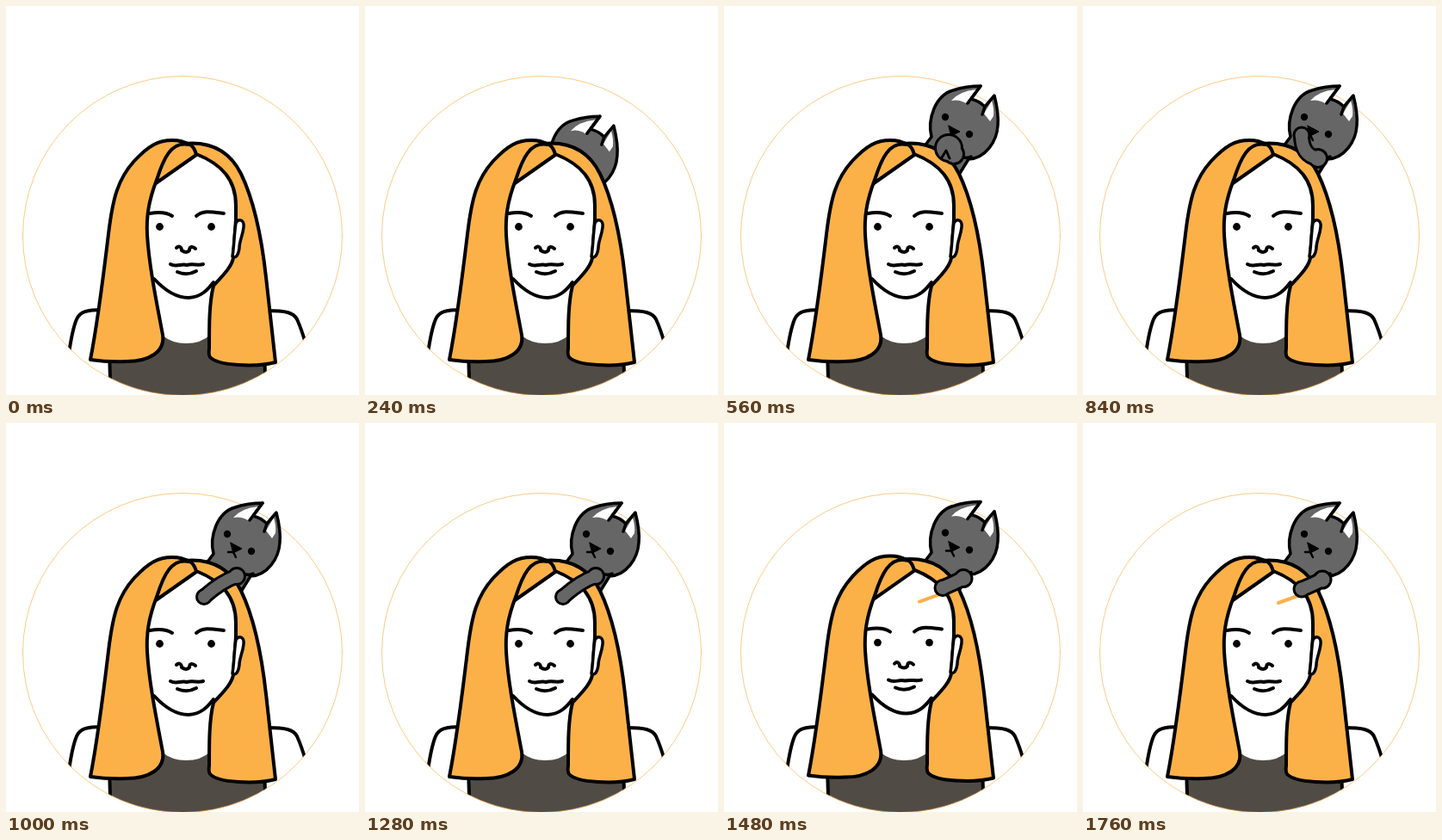
An HTML page with a canvas that plays this animation: 410x452 px, repeating every 2.68 s.

```html
<!DOCTYPE html>
<html lang="en">
<head>
<meta charset="utf-8">
<title>Cat behind the hair</title>
<style>
  html, body { margin: 0; width: 100%; height: 100%; overflow: hidden; background: #fff; }
  canvas { display: block; width: 410px; height: 452px; }
</style>
</head>
<body>
<canvas id="stage" width="410" height="452"></canvas>
<script>
const ctx = document.getElementById('stage').getContext('2d');
const LOOP = 2680, STEP = 40;
const HAIR = '#fbb148', FUR = '#666', SHIRT = '#514b46', INK = '#000', WHITE = '#fff';

const path = d => new Path2D(d);
const disc = (x, y, r) => {
  const p = new Path2D();
  p.arc(x, y, r, 0, Math.PI * 2);
  return p;
};
const clamp = v => Math.max(0, Math.min(1, v));

function fill(p, color) {
  ctx.fillStyle = color;
  ctx.fill(p);
}
function line(p, width = 4, color = INK) {
  ctx.strokeStyle = color;
  ctx.lineWidth = width;
  ctx.stroke(p);
}

const badge = disc(205, 267, 185.5);
const shirt = path('M120 395L182 383Q193 392 209 392Q227 392 237 382L300 395L302 452H120Z');
const shirtSides = path('M120 400L121 434M300 400L301 428');
const shoulders = path('M112 353C94 353 86 355 82 364Q77 376 73 404M304 354C324 354 334 356 338 364Q343 375 348 392');

const face = path('M172 205C164 225 162 260 167 290L172 317C184 330 197 339 212 339C227 338 234 330 241 321L264 296L268 232C267 200 248 180 221 172Z');
const jaw = path('M172 317C184 330 197 339 212 339C227 338 234 330 241 321');
const hairRight = path('M207 160C238 157 260 169 273 195C288 226 297 270 302 315L313 414C290 420 246 418 237 408Q235 405 236 398C236 370 236 345 241 325C253 312 263 302 264 292L267 248V232C267 202 251 184 221 172Z');
const hairLock = path('M174 206L221 173C219 164 214 159 206 159C190 159 181 178 174 206Z');
const hairLeft = path('M98 411C107 365 113 315 119 265C124 223 130 201 149 180C166 162 177 156 193 156Q205 156 212 161C192 157 183 177 175 202C165 228 163 246 164 266C166 300 174 340 182 382C185 402 166 413 140 413Q119 414 98 411Z');
const ear = path('M267 252C271 246 277 249 276 257C275 267 271 273 271 281C270 289 267 294 263 291C265 278 265 264 267 252Z');
const features = path('M167 241Q184 238 193 244M221 244C229 237 238 239 253 241' +
  'M198 281C201 278 204 280 204 284Q210 288 213 284C213 279 217 279 220 282' +
  'M191 300C198 304 203 299 210 301C217 299 223 302 229 300M199 309Q210 314 221 308');

const cat = path('M205 200L241 152C236 132 245 104 266 98C278 94 288 93 298 93L287 108Q296 110 303 117L314 104C317 116 319 130 318 139C317 157 304 177 284 178L255 225');
const catFolds = path('M298 93L283 113M303 117L300 126M279 176Q284 177 287 175');
const earLinings = path('M264 110Q273 99 293 97L281 113Q273 108 264 110ZM302 125L311 110Q314 120 313 128L309 134Z');
const nose = path('M261 139L274 146L264 151Z');
const catMouth = path('M258 150H264L267 156');

// time, then: shoulder x y, bend x y, paw x y, shoulder radius, paw radius
const PAW = [
  [520, 268, 178, 265, 175, 262, 172, 9, 11],
  [560, 267, 172, 264, 168, 261, 165, 10, 14],
  [640, 272, 176, 257, 172, 252, 139, 9, 7.5],
  [680, 272, 176, 257, 172, 252, 137, 9, 7.5],
  [840, 273, 177, 254, 174, 254, 150, 9, 7.5],
  [920, 270, 177, 255, 182, 239, 180, 8, 7.5],
  [1000, 268, 178, 250, 184, 230, 202, 8, 7],
  [1280, 268, 178, 250, 184, 230, 202, 8, 7],
  [1480, 278, 182, 266, 188, 254, 193, 8.5, 7.5]
];

function pawPose(t) {
  const next = PAW.findIndex(k => k[0] > t);
  if (next < 0) return PAW[PAW.length - 1].slice(1);
  const a = PAW[next - 1], b = PAW[next];
  const u = (t - a[0]) / (b[0] - a[0]);
  return a.slice(1).map((v, i) => v + (b[i + 1] - v) * u);
}

function drawPaw(t) {
  const [sx, sy, mx, my, px, py, sr, pr] = pawPose(t);
  const arm = path(`M${sx} ${sy}Q${mx} ${my} ${px} ${py}`);
  const ends = [disc(sx, sy, sr), disc(px, py, pr)];
  const width = 2 * Math.min(sr, pr) - 1;
  line(arm, width + 6);
  ends.forEach(e => line(e, 6));
  line(arm, width, FUR);
  ends.forEach(e => fill(e, FUR));
  if (t >= 560 && t < 600) line(path('M253 176L258 168L262 177'), 3);
}

function drawCat(t) {
  const left = 62 * (1 - clamp((t - 80) / 440)) ** 2;
  ctx.save();
  ctx.translate(-left, left * 1.4);
  fill(cat, FUR);
  fill(earLinings, WHITE);
  line(cat, 3.5);
  line(catFolds, 3.5);
  fill(disc(257, 129, 4.2), INK);
  fill(disc(285, 149, 4.2), INK);
  fill(nose, INK);
  line(nose, 1);
  line(catMouth, 2.5);
  ctx.restore();
}

function drawBody() {
  ctx.save();
  ctx.clip(badge);
  fill(shirt, SHIRT);
  line(shirtSides);
  line(shoulders);
  ctx.restore();
  ctx.globalAlpha = 0.75;
  line(badge, 0.9, HAIR);
  ctx.globalAlpha = 1;
}

function drawHead() {
  fill(face, WHITE);
  line(jaw);
  for (const part of [hairRight, hairLock, hairLeft]) {
    fill(part, HAIR);
    line(part);
  }
  fill(ear, WHITE);
  line(ear, 3.5);
  line(features);
  fill(disc(178.5, 256.5, 4.4), INK);
  fill(disc(238.5, 256.5, 4.4), INK);
}

function drawScratch(t) {
  const u = clamp((t - 1280) / 200);
  if (u > 0) line(path(`M227 209L${227 + 25 * u} ${209 - 9 * u}`), 4, HAIR);
}

function render(now) {
  const t = Math.floor((now % LOOP) / STEP) * STEP;
  ctx.clearRect(0, 0, 410, 452);
  ctx.lineCap = ctx.lineJoin = 'round';
  drawBody();
  ctx.save();
  ctx.translate(0, -7 * Math.sin(Math.PI * clamp((t - 1460) / 300)));
  if (t >= 120) drawCat(t);
  drawHead();
  drawScratch(t);
  if (t >= 520) drawPaw(t);
  ctx.restore();
}

const start = performance.now();
function tick() {
  render(performance.now() - start);
  requestAnimationFrame(tick);
}
tick();
</script>
</body>
</html>
```
